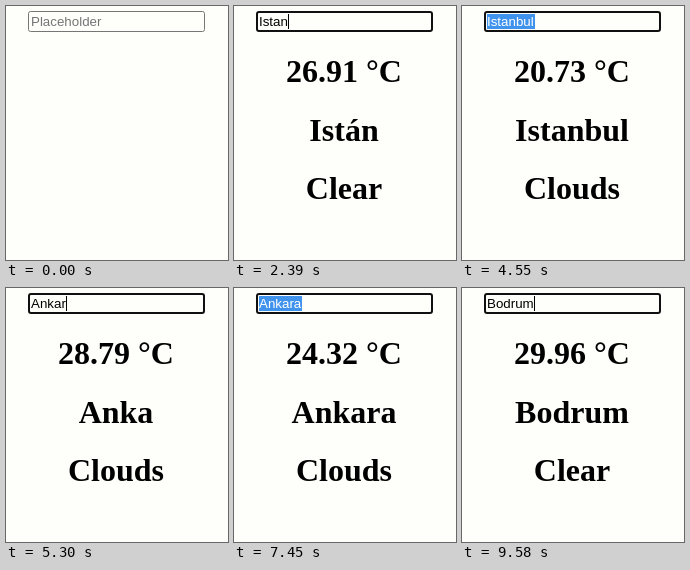
An HTML page that plays this animation: 222 px wide and 254 px high, repeating every 9610 ms.

```html
<!DOCTYPE html>
<html lang="en">
<head>
<meta charset="utf-8">
<title>Weather search</title>
<style>
  html, body { margin: 0; width: 100%; height: 100%; overflow: hidden; background: #fefffa; }
  svg { display: block; width: 222px; height: 254px; }
  text { white-space: pre; }
  .field { font: 13.333px Arial, "Liberation Sans", sans-serif; }
  .head { font: bold 32px "Times New Roman", "Liberation Serif", serif; text-anchor: middle; fill: #000; }
</style>
</head>
<body>
<svg viewBox="0 0 222 254">
  <rect id="box" fill="#fefffa"/>
  <rect id="mark" x="25" y="8" height="15" fill="#4093ec"/>
  <text id="value" class="field" x="25" y="20"></text>
  <rect id="caret" y="8" width="1" height="15" fill="#000"/>
  <text id="temp" class="head" x="110" y="76"></text>
  <text id="city" class="head" x="110" y="135"></text>
  <text id="sky" class="head" x="110" y="193"></text>
</svg>
<script>
const LOOP = 9610, BLINK = 500, LEFT = 25;
const $ = id => document.getElementById(id);
const set = (el, attrs) => { for (const k in attrs) el.setAttribute(k, attrs[k]); };

// Each word: the time of every keystroke, then the time it gets selected.
const words = [
  { text: 'Istanbul', keys: [1670, 1940, 2060, 2180, 2300, 2480, 2620, 2760], select: 3730 },
  { text: 'Ankara', keys: [4700, 4850, 4980, 5110, 5230, 5400], select: 6500 },
  { text: 'Bodrum', keys: [7500, 7700, 7850, 8000, 8150, 8290] }
];

const input = [{ at: 0, text: '' }, { at: 700, text: '', focus: true }];
for (const { text, keys, select } of words) {
  keys.forEach((at, i) => input.push({ at, text: text.slice(0, i + 1), focus: true }));
  if (select) input.push({ at: select, text, focus: true, selected: true });
}

const results = [
  { at: 0, lines: ['', '', ''] },
  { at: 2340, lines: ['26.91 °C', 'Istán', 'Clear'] },
  { at: 2880, lines: ['20.73 °C', 'Istanbul', 'Clouds'] },
  { at: 5240, lines: ['28.79 °C', 'Anka', 'Clouds'] },
  { at: 5880, lines: ['24.32 °C', 'Ankara', 'Clouds'] },
  { at: 8240, lines: ['12.49 °C', 'Bod', 'Clouds'] },
  { at: 8880, lines: ['29.96 °C', 'Bodrum', 'Clear'] }
];

const current = (steps, t) => steps.reduce((last, s) => s.at <= t ? s : last);
const frame = (inset, stroke, width, rx) => ({
  x: 22 + inset, y: 5 + inset, width: 177 - 2 * inset, height: 21 - 2 * inset,
  stroke, 'stroke-width': width, rx
});

let shownInput, shownResult;

function drawInput({ text, focus, selected }) {
  const value = $('value');
  set($('box'), focus ? frame(1, '#101010', 2, 2) : frame(0.5, '#767676', 1, 2));
  value.textContent = text || 'Placeholder';
  set(value, { fill: selected ? '#fff' : text ? '#000' : '#757575' });
  const width = text ? value.getComputedTextLength() : 0;
  set($('mark'), { width: selected ? Math.round(width + 1) : 0 });
  set($('caret'), { x: Math.round(LEFT + width) });
}

function draw(t) {
  const step = current(input, t);
  if (step !== shownInput) drawInput(shownInput = step);
  const lit = step.focus && !step.selected && Math.floor((t - step.at) / BLINK) % 2 === 0;
  set($('caret'), { visibility: lit ? 'visible' : 'hidden' });

  const result = current(results, t);
  if (result !== shownResult) {
    shownResult = result;
    ['temp', 'city', 'sky'].forEach((id, i) => { $(id).textContent = result.lines[i]; });
  }
}

const start = performance.now();
function tick() {
  draw((performance.now() - start) % LOOP);
  requestAnimationFrame(tick);
}
tick();
</script>
</body>
</html>
```
